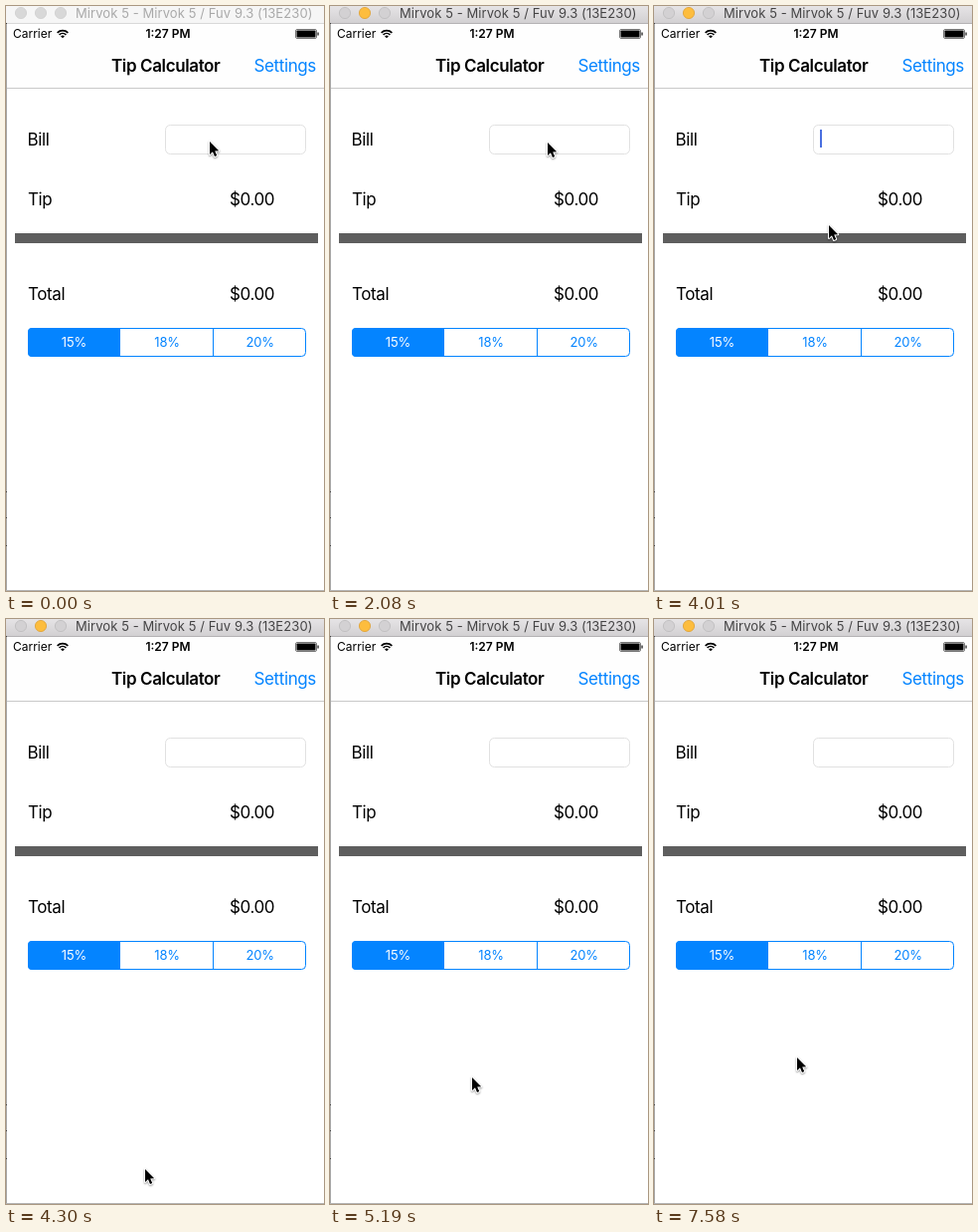
An HTML page with a canvas for the animation above (8000 ms loop, 320x587 px).

```html
<!DOCTYPE html>
<html lang="en">
<head>
<meta charset="utf-8">
<title>Tip Calculator</title>
<style>
  html, body { margin: 0; width: 100%; height: 100%; overflow: hidden; background: #fff; }
  canvas { display: block; }
</style>
</head>
<body>
<canvas id="stage" width="320" height="587"></canvas>
<script>
const ctx = document.getElementById('stage').getContext('2d');
const LOOP = 8000;
const BLUE = '#0484ff';

const POINTER = [
  [0, 205, 136], [140, 219, 137], [3270, 209, 144], [3420, 207, 142],
  [4010, 176, 220], [4160, 140, 552], [4900, 140, 526], [5040, 140, 465],
  [5190, 143, 460], [7440, 143, 438], [7580, 144, 440]
];
const CARET = [[0, 0], [3420, 1], [4160, 0.5], [4300, 0]];
const FOCUS_TIME = 2080;

const stepAt = (steps, t) => steps.filter(s => s[0] <= t).pop();

function rect(x, y, w, h, color) {
  ctx.fillStyle = color;
  ctx.fillRect(x, y, w, h);
}

function text(str, x, y, size, { color = '#000', weight = 400, spacing = 0, align = 'left' } = {}) {
  ctx.font = `${weight} ${size}px Inter, Roboto, sans-serif`;
  ctx.letterSpacing = spacing + 'px';
  ctx.textAlign = align;
  ctx.fillStyle = color;
  ctx.fillText(str, x, y);
}

function roundPath(x, y, w, h, r) {
  ctx.beginPath();
  ctx.roundRect(x, y, w, h, r);
}

function outline(color, width = 1) {
  ctx.strokeStyle = color;
  ctx.lineWidth = width;
  ctx.stroke();
}

function light(x, fill, edge) {
  ctx.beginPath();
  ctx.arc(x, 7, 5.6, 0, Math.PI * 2);
  ctx.fillStyle = fill;
  ctx.fill();
  outline(edge, 0.8);
}

function titleBar(active) {
  const shade = ctx.createLinearGradient(0, 0, 0, 17);
  shade.addColorStop(0, active ? '#e6e4e6' : '#f6f6f6');
  shade.addColorStop(1, active ? '#d2d0d2' : '#f6f6f6');
  rect(0, 0, 320, 17, shade);
  rect(0, 17, 320, 1, active ? '#b4b2b4' : '#d8d8d8');
  const idle = active ? ['#d3d1d3', '#bdbbbd'] : ['#d8d8d8', '#cfcfcf'];
  light(15, ...idle);
  light(35, ...(active ? ['#fdbd3e', '#dfa032'] : idle));
  light(55, ...idle);
  text('Mirvok 5 - Mirvok 5 / Fuv 9.3 (13E230)', 70, 12, 13,
    { color: active ? '#454445' : '#a9a9a9', spacing: 0.08 });
}

function wifi(x, y) {
  const arc = r => {
    ctx.beginPath();
    ctx.arc(x, y, r, -Math.PI * 0.75, -Math.PI * 0.25);
  };
  for (const r of [7.6, 4.8]) {
    arc(r);
    outline('#000', 1.7);
  }
  arc(2.7);
  ctx.lineTo(x, y);
  ctx.fillStyle = '#000';
  ctx.fill();
}

function battery() {
  roundPath(291.5, 23.5, 21, 9, 1.5);
  outline('#555', 0.8);
  roundPath(292.5, 24.5, 19, 7, 0.8);
  ctx.fillStyle = '#000';
  ctx.fill();
  rect(313.4, 26.5, 1.3, 3, '#222');
}

function header() {
  rect(1, 18, 319, 64, '#fefefe');
  rect(1, 82, 319, 1, '#c9c9c9');
  text('Carrier', 7, 32, 12);
  wifi(57, 32.3);
  text('1:27 PM', 163, 32, 12, { weight: 600, align: 'center' });
  battery();
  text('Tip Calculator', 106, 66, 17, { weight: 600, spacing: -0.38 });
  text('Settings', 249.5, 66, 17, { color: BLUE, spacing: -0.38 });
}

function segments() {
  roundPath(22.5, 323.5, 279, 28, 4);
  outline(BLUE);
  roundPath(22, 323, 93, 29, [4, 0, 0, 4]);
  ctx.fillStyle = BLUE;
  ctx.fill();
  rect(114, 323, 1, 29, BLUE);
  rect(208, 323, 1, 29, BLUE);
  ['15%', '18%', '20%'].forEach((label, i) =>
    text(label, 68.5 + i * 93.6, 342, 13,
      { color: i ? BLUE : '#fff', spacing: -0.1, align: 'center' }));
}

function form() {
  const row = { spacing: -0.4 };
  text('Bill', 21.5, 140, 17, row);
  text('Tip', 22, 200, 17, row);
  text('Total', 22, 295, 17, row);
  for (const y of [200, 295]) text('$0.00', 225, y, 17, row);
  roundPath(160.5, 119.5, 141, 29, 5);
  outline('#e1e1e1');
  rect(9, 228, 305, 10, '#5e5e5e');
  segments();
}

function pointer(x, y) {
  ctx.save();
  ctx.translate(x, y);
  ctx.beginPath();
  ctx.moveTo(0, 0);
  for (const [px, py] of [[0, 13], [3, 10.3], [5, 15], [7.2, 14], [5.2, 9.5], [9.2, 9.2]])
    ctx.lineTo(px, py);
  ctx.closePath();
  ctx.lineJoin = 'round';
  ctx.shadowColor = 'rgba(0,0,0,0.4)';
  ctx.shadowBlur = 2;
  ctx.shadowOffsetY = 1;
  outline('#fff', 2);
  ctx.shadowColor = 'transparent';
  ctx.fillStyle = '#000';
  ctx.fill();
  ctx.restore();
}

function draw(now) {
  const t = now % LOOP;
  rect(0, 0, 320, 587, '#fff');
  titleBar(t >= FOCUS_TIME);
  header();
  form();
  rect(0, 18, 1, 569, '#a9a9a9');
  rect(0, 586, 320, 1, '#b5b5b5');
  for (const y of [17, 487, 513, 541]) rect(0, y, 1, 1, '#444');

  ctx.globalAlpha = stepAt(CARET, t)[1];
  rect(167, 124, 2, 18, '#4a6fe0');
  ctx.globalAlpha = 1;

  const [, x, y] = stepAt(POINTER, t);
  pointer(x, y);
}

function frame() {
  draw(performance.now());
  requestAnimationFrame(frame);
}
frame();
</script>
</body>
</html>
```
